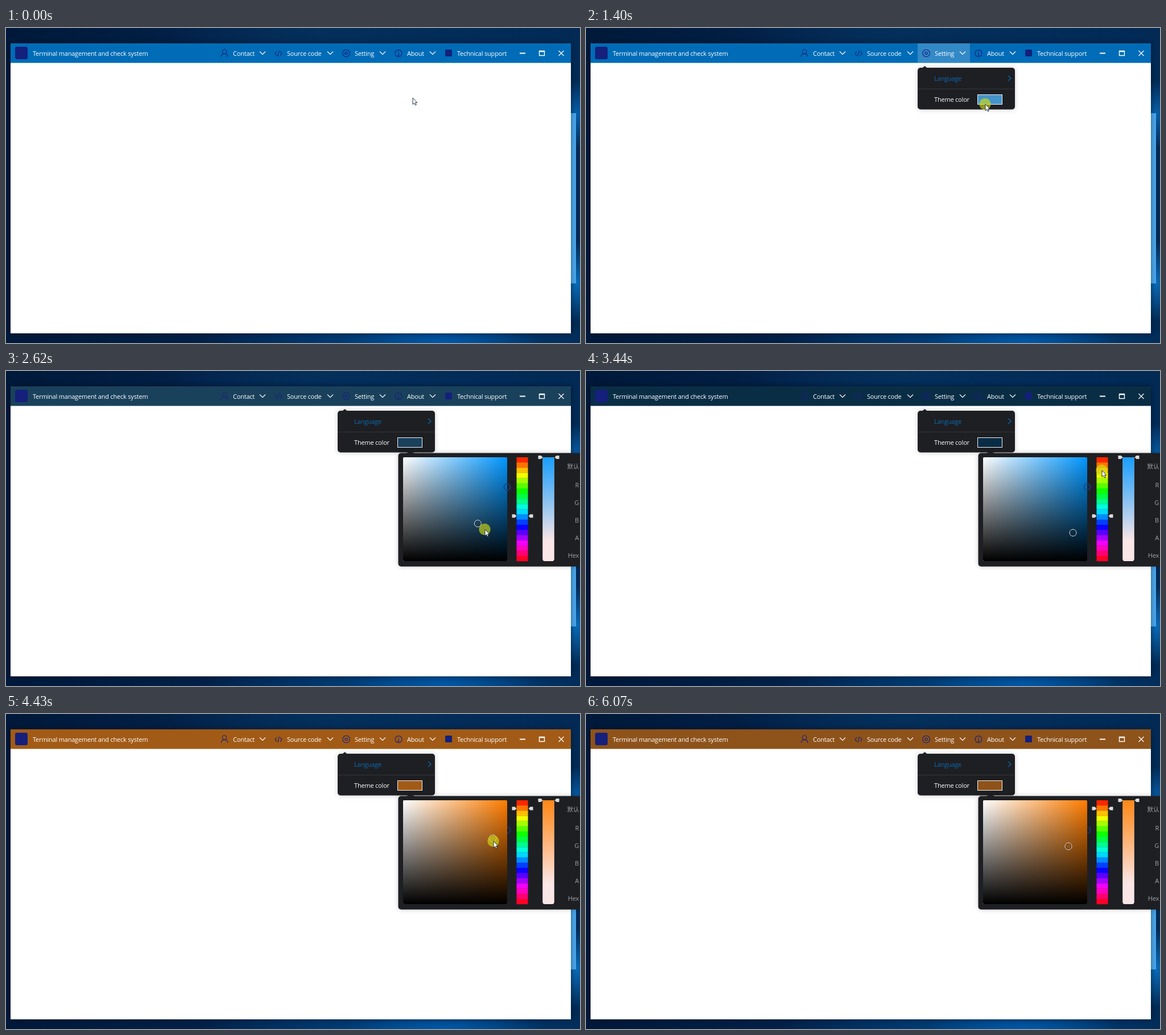
An HTML page that plays this animation: 1009x555 px, repeating every 6.29 s.

```html
<!DOCTYPE html>
<html lang="en">
<head>
<meta charset="utf-8">
<title>Theme color picker</title>
<style>
html, body { margin: 0; width: 100%; height: 100%; overflow: hidden; background: #001a3a; }
#stage {
  position: relative; width: 1009px; height: 555px; overflow: hidden;
  background:
    radial-gradient(170px 34px at 770px 555px, #0058a8, transparent),
    radial-gradient(360px 50px at 700px 555px, #00427f, transparent),
    radial-gradient(36px 70px at 1002px 448px, #0a6cba, transparent),
    radial-gradient(36px 60px at 1002px 152px, #0860ac, transparent),
    radial-gradient(300px 50px at 560px 6px, #04305c, transparent),
    linear-gradient(90deg, #00193a, #021f45 30%, #032a56 60%, #032b58 85%, #022a55);
}
svg { position: absolute; left: 0; top: 0; }
text {
  font: 11px "Open Sans", "Noto Sans", sans-serif;
  letter-spacing: -.2px; fill: #fff;
}
.line { fill: none; stroke: #fff; stroke-width: 1.15; }
.icon { fill: none; stroke: #17217d; stroke-width: 1.1; }
.card { fill: #1e1f23; }
.shade { filter: drop-shadow(0 0 4px rgba(0, 0, 0, .2)); }
.lab text { fill: #a3a3a5; text-anchor: end; }
.lab .cjk { font: 10.5px "Noto Sans CJK SC", "Noto Sans CJK", sans-serif; letter-spacing: 0; }
.mark { fill: #dcdcdc; }
.trace { fill: none; stroke: #1d3a7c; stroke-width: 2; opacity: .75; }
</style>
</head>
<body>
<div id="stage">
<svg width="1009" height="555" viewBox="0 0 1009 555">
  <defs>
    <linearGradient id="white">
      <stop stop-color="#fff"/><stop offset="1" stop-color="#fff" stop-opacity="0"/>
    </linearGradient>
    <linearGradient id="black" x2="0" y2="1">
      <stop stop-opacity="0"/><stop offset="1"/>
    </linearGradient>
    <linearGradient id="fade" x2="0" y2="1">
      <stop id="fadeTop" stop-opacity=".9"/><stop offset=".8" stop-color="#fae6e6"/>
    </linearGradient>
    <path id="chev" class="line" d="M-5 -2.5L0 2.5L5 -2.5"/>
    <path id="tag" class="mark" d="M-8 -3H-3L0 0L-3 3H-8Z"/>
    <path id="slot" d="M943.5 152H963.5V331A4 4 0 0 1 959.5 335H947.5A4 4 0 0 1 943.5 331Z"/>
  </defs>

  <rect x="702" y="150" width="300" height="300" fill="#4aa6ea"/>

  <g style="filter:drop-shadow(0 0 4px rgba(0,0,0,.45))">
    <rect x="8" y="27" width="985" height="511" fill="#fff"/>
  </g>
  <rect id="bar" x="8" y="27" width="985" height="34.5"/>
  <rect id="hover" x="583" y="27" width="92" height="34.5" fill="#fff" opacity=".2"/>

  <rect x="16" y="33" width="22" height="22" rx="3" fill="#14207c"/>
  <text x="47" y="49">Terminal management and check system</text>

  <g class="icon">
    <circle cx="384" cy="41.5" r="3.7"/>
    <path d="M378.3 51C378.3 46.5 381 45.4 384 45.4S389.7 46.5 389.7 51"/>
    <path d="M476 41L473 44.8L476 48.6M482 41L485 44.8L482 48.6M480.3 39.6L477.7 50"/>
    <path d="M595.3 38.5H600.7L604 42V47L600.7 50.5H595.3L592 47V42Z"/>
    <circle cx="598" cy="44.5" r="2.2"/>
    <circle cx="690" cy="44.5" r="6"/>
    <path d="M690 43V48.5M690 40.3V41.8M688.5 48.2H691.5"/>
  </g>
  <rect x="772" y="38" width="12" height="12" rx="1.5" fill="#14207c"/>

  <text x="399" y="49">Contact</text>
  <text x="494" y="49">Source code</text>
  <text x="613" y="49">Setting</text>
  <text x="705" y="49">About</text>
  <text x="793" y="49">Technical support</text>
  <use href="#chev" x="451" y="44"/>
  <use href="#chev" x="570" y="44"/>
  <use href="#chev" x="662" y="44"/>
  <use href="#chev" x="750" y="44"/>

  <path d="M903 44.5H913" stroke="#fff" stroke-width="2"/>
  <path d="M937.5 40.5H946.5V48.5H937.5ZM937 41.5H947" fill="none" stroke="#fff" stroke-width="1.4"/>
  <path class="line" d="M971.5 40L980.5 49M980.5 40L971.5 49"/>

  <g id="menu">
    <g class="card shade">
      <path d="M590.5 71L595.5 67L600.5 71Z"/>
      <rect x="583" y="70" width="171" height="73.5" rx="5"/>
    </g>
    <text x="612" y="93" style="fill:#0a6cb6">Language</text>
    <path d="M742 84L747 88.5L742 93" fill="none" stroke="#0a6cb6" stroke-width="1.2"/>
    <path d="M583 107.5H754" stroke="#35363b"/>
    <text x="612" y="130">Theme color</text>
    <rect id="swatch" x="688.5" y="117.5" width="43" height="17" stroke="#f2f2f2"/>
    <rect id="lit" x="689" y="118" width="42" height="16" fill="#fff" opacity=".27"/>
  </g>

  <g id="picker">
    <g class="card shade">
      <path d="M703.5 145L711 141L718.5 145Z"/>
      <rect x="689.5" y="144.5" width="340" height="200" rx="5"/>
    </g>
    <circle id="under" class="trace" cx="881" cy="204.5" r="5.5"/>
    <rect id="pure" x="698" y="152" width="183" height="183" rx="2"/>
    <rect x="698" y="152" width="183" height="183" rx="2" fill="url(#white)"/>
    <rect x="698" y="152" width="183" height="183" rx="2" fill="url(#black)"/>
    <circle id="over" class="trace" cx="881" cy="204.5" r="5.5"/>
    <g id="bands"></g>
    <use href="#slot" fill="#fae6e6"/>
    <use href="#slot" fill="url(#fade)"/>
    <g id="hueTags">
      <use href="#tag" transform="translate(897.5 0)"/>
      <use href="#tag" transform="translate(918.5 0) scale(-1 1)"/>
    </g>
    <g transform="translate(0 152)">
      <use href="#tag" transform="translate(943.5 0)"/>
      <use href="#tag" transform="translate(964.5 0) scale(-1 1)"/>
    </g>
    <g class="lab">
      <text class="cjk" x="1007.5" y="171.5">默认</text>
      <text x="1007" y="205">R</text>
      <text x="1007" y="236">G</text>
      <text x="1007" y="267">B</text>
      <text x="1007" y="298">A</text>
      <text x="1007" y="328.5">Hex</text>
    </g>
    <g id="ring" fill="none">
      <circle r="5" stroke="#111" stroke-opacity=".6"/>
      <circle r="6" stroke="#e4e4e4"/>
    </g>
  </g>

  <g id="cursor">
    <circle id="halo" cx="-.5" cy="0" r="10.2" fill="#d2dc14" opacity=".64"/>
    <path d="M0 0V11.5L2.6 9.2L4.4 13L6.3 12.2L4.5 8.5H7.8Z" fill="#fff" stroke="#14233c" stroke-width=".9"/>
  </g>
</svg>
</div>
<script>
const LOOP = 6290, STEPS = 31;
const LEFT = 698, TOP = 152, SIZE = 183;

// Pointer stops: step, x, y
const PATH = [[0, 715, 123], [4, 640, 50], [7, 702, 134], [9, 715, 176], [13, 842, 279],
  [15, 856, 285], [17, 907, 175], [20, 850, 198], [22, 857, 224], [25, 848, 233], [30, 884, 580]];

// Steps during which the button is held
const OPEN = [7, 8], DRAG = [11, 15], HUE = [17, 19], TUNE = [20, 25];
const LAG = .4;

const $ = id => document.getElementById(id);
const show = (id, on) => { $(id).style.display = on ? "" : "none"; };
const move = (id, x, y) => $(id).setAttribute("transform", `translate(${x} ${y})`);
const within = (s, [a, b]) => s >= a && s < b;

const BANDS = 20, BAND = SIZE / BANDS;
$("bands").innerHTML = Array.from({ length: BANDS }, (_, i) =>
  `<rect x="897.5" y="${TOP + i * BAND}" width="20" height="${BAND + .2}"
    fill="hsl(${(i + .5) * 360 / BANDS} 100% 50%)"/>`).join("");

function pointer(s) {
  const i = Math.max(1, PATH.findIndex(k => k[0] >= s));
  const [a, ax, ay] = PATH[i - 1], [b, bx, by] = PATH[i];
  const p = (s - a) / (b - a);
  return [ax + (bx - ax) * p, ay + (by - ay) * p];
}

// The ring trails the pointer and rests where the last drag ended
function ringAt(s) {
  if (s < DRAG[0]) return [LEFT + SIZE, 204];
  const end = s < TUNE[0] ? DRAG[1] : TUNE[1];
  return pointer(s < end ? s - LAG : end);
}

function hsv(h, s, v) {
  const part = n => {
    const k = (n + h / 60) % 6;
    return Math.round(255 * v * (1 - s * Math.max(0, Math.min(k, 4 - k, 1))));
  };
  return `rgb(${part(5)},${part(3)},${part(1)})`;
}

function draw(s) {
  const [rx, ry] = ringAt(s);
  const hueY = s <= HUE[0] ? 256 : 167;
  const hue = (hueY - TOP) / SIZE * 360;
  const theme = hsv(hue, (rx - LEFT) / SIZE, 1 - (ry - TOP) / SIZE);
  const pure = hsv(hue, 1, 1);

  $("bar").setAttribute("fill", theme);
  $("swatch").setAttribute("fill", theme);
  $("pure").setAttribute("fill", pure);
  $("fadeTop").setAttribute("stop-color", pure);
  move("hueTags", 0, hueY - .5);
  move("ring", rx, ry);
  move("cursor", ...pointer(s));

  show("hover", within(s, [3, OPEN[1]]));
  show("menu", s >= 4);
  show("lit", within(s, OPEN));
  show("picker", s >= OPEN[1]);
  show("under", s >= DRAG[0]);
  show("over", within(s, [DRAG[0], HUE[0] + 1]));
  show("halo", [OPEN, DRAG, HUE, TUNE].some(span => within(s, span)));
}

function frame() {
  // Steps fall slightly ahead of an even beat
  const now = performance.now() % LOOP + 40;
  draw(Math.min(STEPS - 1, Math.floor(now * STEPS / LOOP)));
  requestAnimationFrame(frame);
}
frame();
</script>
</body>
</html>
```
